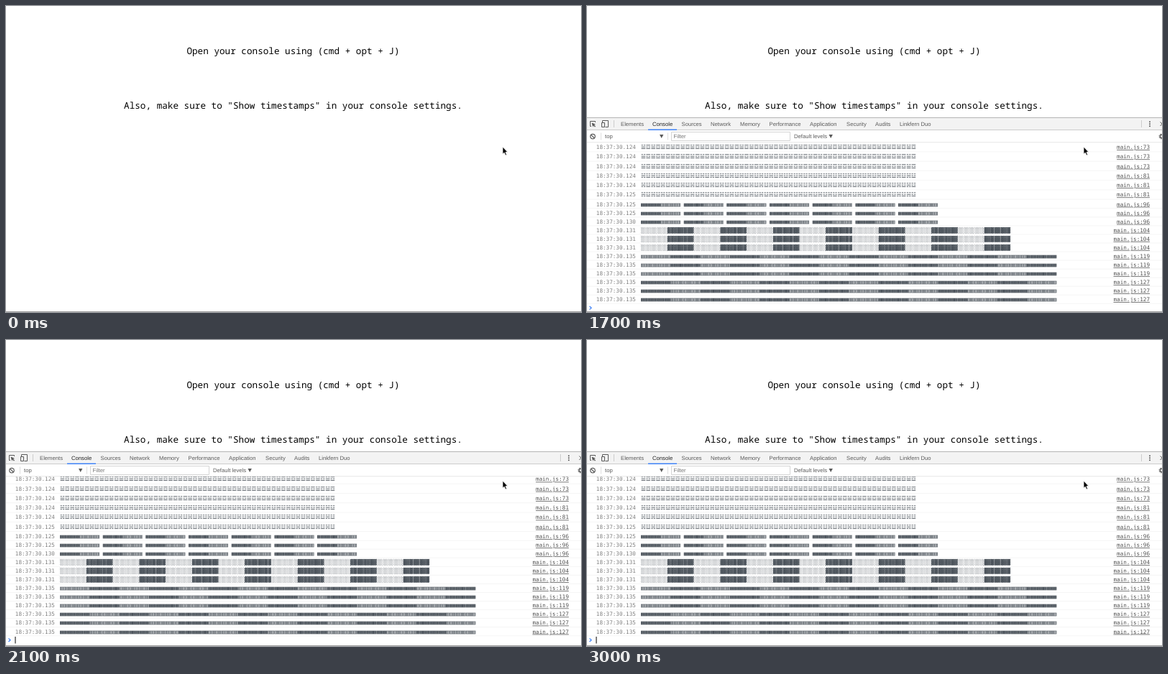
Write an HTML page that moves like this. It is 800 by 426 pixels and loops after 3100 ms.

```html
<!DOCTYPE html>
<html lang="en">
<head>
<meta charset="utf-8">
<title>Console patterns</title>
<style>
html, body { margin: 0; width: 100%; height: 100%; overflow: hidden; background: #fff; }
svg { display: block; width: 800px; height: 426px; }
text { white-space: pre; text-rendering: geometricPrecision; }
.head { font: 12.66px "Roboto Mono", "Noto Sans Mono", monospace; text-anchor: middle; }
.ui { font: 7.7px "Liberation Sans", Arial, sans-serif; fill: #5a5a5a; }
.log { font: 7.63px "DejaVu Sans Mono", Menlo, monospace; fill: #303942; }
.log .time { fill: #808080; }
.log .link { fill: #545454; text-anchor: end; text-decoration: underline; }
.log .tri { font-family: "DejaVu Sans", sans-serif; }
.icon { fill: none; stroke: #5a5a5a; }
</style>
</head>
<body>
<svg viewBox="0 0 800 426">
  <text class="head" x="399.5" y="66.5">Open your console using (cmd + opt + J)</text>
  <text class="head" x="399.5" y="142.5">Also, make sure to "Show timestamps" in your console settings.</text>

  <g id="tabs">
    <path fill="#f3f3f3" d="M0 155h800v18H0z"/>
    <path fill="#b4b4b4" d="M0 155h800v1H0z"/>
    <path fill="#ccc" d="M0 172h800v1H0zM37 159h1v10h-1zM771 159h1v10h-1z"/>
    <path fill="#3e82f7" d="M85 171.5h40v1.5H85z"/>
    <path class="icon" d="M6 167.5H4.5V160.500H11.500V162M21.500 162V159.500H29.500V168.500H25.500M20.500 162.500H24.500V168.500H20.500zM797.500 161.500L803 167M797.500 167L803 161.500"/>
    <path fill="#5a5a5a" d="M6.500 162.500L12 164.700 10 165.600 12 167.600 11 168.600 9 166.600 8.200 168.500z"/>
    <g fill="#5a5a5a"><circle cx="783" cy="161.300" r="1"/><circle cx="783" cy="164.300" r="1"/><circle cx="783" cy="167.300" r="1"/></g>
  </g>

  <g id="bar" class="ui">
    <path fill="#ddd" d="M0 189.500h800v.8H0zM19 176.500h1v10h-1zM112 176.500h1v10h-1z"/>
    <path fill="#fff" stroke="#d4d4d4" d="M117.500 175.500h165v12h-165z"/>
    <path class="icon" stroke-width="1.200" d="M4.700 181.700a3.300 3.300 0 1 0 6.600 0a3.300 3.300 0 1 0-6.600 0M5.700 179.400l4.600 4.600"/>
    <circle class="icon" cx="799.500" cy="181.500" r="2.200" stroke-width="1.500"/>
    <circle class="icon" cx="799.500" cy="181.500" r="3.500" stroke-dasharray="1.400 1.350"/>
    <text x="25" y="184.200">top</text>
    <text x="120.500" y="184.200" fill="#757575">Filter</text>
    <text x="288" y="184.200">Default levels</text>
  </g>

  <g id="full" class="ui">
    <path d="M101 179h5.400l-2.700 5zM336.500 179h5.400l-2.700 5z"/>
    <text x="435" y="166.800">Linkfern Duo</text>
  </g>

  <clipPath id="pane"><path d="M0 190.300h800V425H0z"/></clipPath>
  <g clip-path="url(#pane)">
    <g id="log" class="log">
      <path fill="none" stroke="#3e82f7" stroke-width="1.200" d="M3.500 418l2.600 2.300-2.600 2.300"/>
    </g>
  </g>
  <path id="caret" d="M12.500 413h1v9.500h-1z"/>

  <path fill="#a0a0a0" d="M0 425h800v1H0z"/>
  <path stroke="#fff" stroke-width=".8" d="M691 196v10.200l2.300-2 1.600 3.700 1.700-.7-1.600-3.600h3z"/>
</svg>
<script>
const $ = id => document.getElementById(id);

function label(parent, cls, x, y, str) {
  const t = document.createElementNS("http://www.w3.org/2000/svg", "text");
  t.setAttribute("class", cls);
  t.setAttribute("x", x);
  t.setAttribute("y", y);
  t.textContent = str;
  parent.append(t);
  return t;
}

const tabs = { Elements: 47, Console: 91, Sources: 131.5, Network: 172, Memory: 213,
  Performance: 253.5, Application: 310, Security: 361, Audits: 401 };
for (const name in tabs) {
  const t = label($("tabs"), "ui", tabs[name], 166.8, name);
  if (name === "Console") t.style.fill = "#222";
}

const pair = (a, b, n) => a.repeat(n) + b.repeat(n);
const patterns = [
  [73, "☱☲".repeat(28)],
  [81, "☵☳".repeat(28)],
  [96, (pair("▩", "▥", 6) + " ").repeat(7)],
  [104, pair("░", "▓", 8).repeat(7)],
  [119, pair("▥", "▩", 9).repeat(7)],
  [127, pair("▩", "▥", 9).repeat(7)]
];
const stamps = [124, 124, 124, 124, 124, 125, 125, 125, 130, 131, 131, 131];

for (let i = 0; i < 18; i++) {
  const [line, art] = patterns[Math.floor(i / 3)];
  const y = i < 6 ? 196.3 + 13.25 * i : 275.8 + 12.05 * (i - 6);
  const base = y + 2.8;
  label($("log"), "time", 12.8, base, "18:37:30." + (stamps[i] || 135));
  label($("log"), i < 6 ? "tri" : "art", 75, base, art);
  label($("log"), "link", 783, base, "main.js:" + line);
  const rule = document.createElementNS("http://www.w3.org/2000/svg", "path");
  rule.setAttribute("d", `M0 ${y + (i < 6 ? 6.6 : 6)}h800`);
  rule.setAttribute("stroke", "#f0f0f0");
  rule.setAttribute("stroke-width", .65);
  $("log").prepend(rule);
}

const show = (id, on) => $(id).style.display = on ? "" : "none";
const start = performance.now();

function draw() {
  const t = (performance.now() - start) % 3100;
  show("tabs", t >= 1300);
  show("bar", t >= 1400);
  show("full", t >= 1700);
  show("log", t >= 1700);
  $("log").setAttribute("transform", `translate(0 ${t < 1800 ? 0 : -2.6})`);
  show("caret", t >= 1800 && (t - 1800) % 1000 < 500);
  requestAnimationFrame(draw);
}
draw();
</script>
</body>
</html>
```
